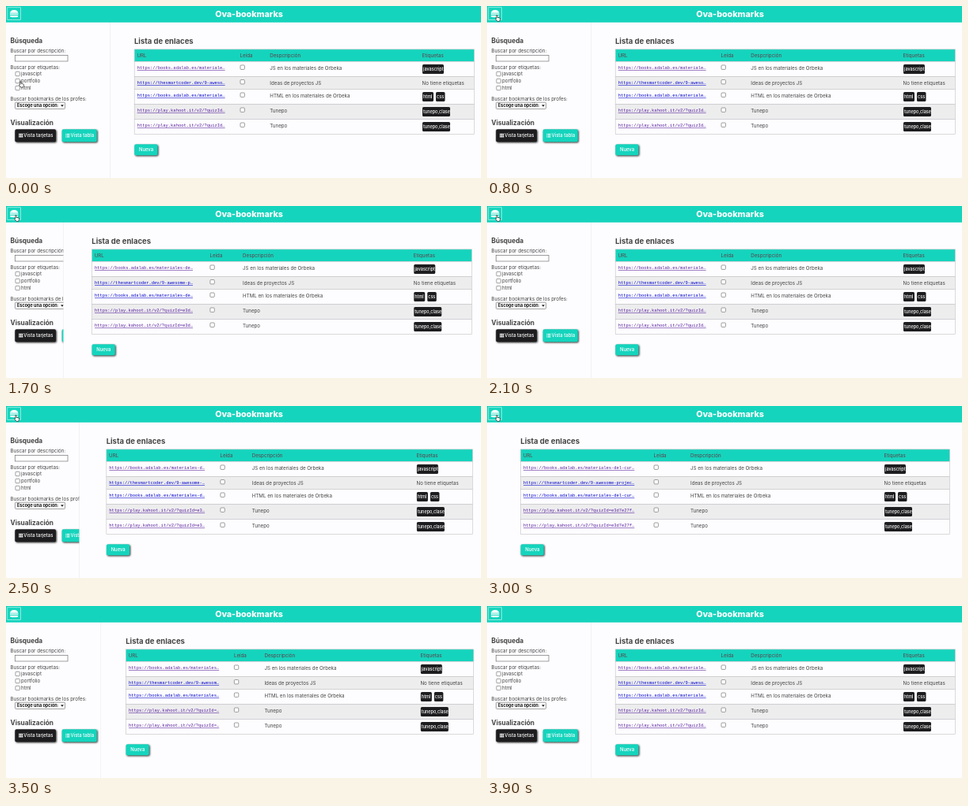
Animation, 600 px wide and 218 px high, one loop 4.6 s. Source, as an HTML page:

```html
<!DOCTYPE html>
<html lang="es">
<head>
<meta charset="utf-8">
<style>
  html, body { margin: 0; width: 100%; height: 100%; overflow: hidden; background: #fdfcfe; }
  svg { display: block; width: 600px; height: 218px; }
  text { font: 6.2px Inter, sans-serif; fill: #444; white-space: pre; }
  .title { font-size: 10.7px; font-weight: 800; fill: #fff; text-anchor: middle; }
  .h1 { font-size: 9.5px; font-weight: 700; }
  .h2 { font-size: 8.3px; font-weight: 700; }
  .th { fill: #5c4148; }
  .btn { font-size: 5.9px; font-weight: 500; fill: #fff; }
  .tag { font-size: 5.5px; font-weight: 500; fill: #fff; }
  .option { font-size: 5.5px; font-weight: 700; fill: #111; }
  .link { font: 5.45px "Liberation Mono", monospace; text-decoration: underline; fill: #00c; }
  .visited { fill: #551a9b; }
  .shadow { filter: drop-shadow(1px 1px 1px #333); }
</style>
</head>
<body>
<svg id="stage" viewBox="0 0 600 218"></svg>
<script>
const LOOP = 4600, STEP = 100, SLIDE = 500;
const CLICKS = [820, 1540, 2400, 3180]; // close, open, close, open
const TEAL = '#15d4bd', BLACK = '#1d1d1f';
const GRID = 'stroke="#c4c4c6" stroke-width=".6"';
const stage = document.getElementById('stage');

const BOOKS = 'https://books.adalab.es/materiales-del-cur';
const QUIZ = 'https://play.kahoot.it/v2/?quizId=e3d7e27f';
// top and bottom edge, text baseline, checkbox top
const ROWS = [
  { top: 70.3, end: 89.5, base: 80.5, box: 75, url: BOOKS, visited: true,
    text: 'JS en los materiales de Orbeka', tags: [['javascript', 27]] },
  { top: 89.5, end: 105.5, base: 99.5, box: 93.5, url: 'https://thesmartcoder.dev/9-awesome-projec',
    text: 'Ideas de proyectos JS', tags: [] },
  { top: 105.5, end: 124.5, base: 115.5, box: 110, url: BOOKS,
    text: 'HTML en los materiales de Orbeka', tags: [['html', 14], ['css', 11.5]] },
  { top: 124.5, end: 143.5, base: 134.5, box: 129, url: QUIZ, visited: true,
    text: 'Tunepo', tags: [['tunepo,clase', 35]] },
  { top: 143.5, end: 162.5, base: 153.5, box: 148, url: QUIZ, visited: true,
    text: 'Tunepo', tags: [['tunepo,clase', 35]] },
];

const mix = (a, b, k) => a + (b - a) * k;
const rect = (x, y, w, h, fill, extra = '') =>
  `<rect x="${x}" y="${y}" width="${w}" height="${h}" fill="${fill}" ${extra}/>`;
const text = (x, y, s, cls = '') => `<text x="${x}" y="${y}" class="${cls}">${s}</text>`;
const field = (x, y, w, h, r = 0) => rect(x, y, w, h, '#fff', `rx="${r}" stroke="#767676" stroke-width=".7"`);
const checkbox = (x, y) => field(x, y, 5.4, 5.4, 1);
const button = (x, y, w, h, fill) => rect(x, y, w, h, fill, 'rx="1.8" class="shadow"');

// CSS "ease" curve: cubic-bezier(.25, .1, .25, 1)
function ease(x) {
  const bezier = (a, b, s) => 3 * a * s * (1 - s) ** 2 + 3 * b * s * s * (1 - s) + s ** 3;
  let lo = 0, hi = 1;
  for (let i = 0; i < 20; i++) {
    const s = (lo + hi) / 2;
    if (bezier(.25, .25, s) < x) lo = s; else hi = s;
  }
  return bezier(.1, 1, lo);
}

function openness(t) {
  const i = CLICKS.findLastIndex(c => t >= c);
  if (i < 0) return 1;
  const k = ease(Math.min(1, (t - CLICKS[i]) / SLIDE));
  return i % 2 ? k : 1 - k;
}

function header() {
  return rect(0, 0, 600, 20.8, TEAL) + text(307, 13.7, 'Ova-bookmarks', 'title') +
    rect(1.8, 1.8, 16.6, 15.8, 'none', 'stroke="#fff" stroke-opacity=".85" stroke-width=".6"') +
    '<path fill="#fff" d="M5 8.8Q5.6 5 10.2 5T15.4 8.8ZM5 9.6h10.4v1.5H5ZM5 11.9h10.4q0 2.3-2 2.3H7q-2 0-2-2.3Z"/>';
}

function sidebar(p) {
  const width = 132 * p;
  let s = text(5.5, 47.2, 'Búsqueda', 'h2') +
    text(5.5, 59.4, 'Buscar por descripción:') + field(11.5, 62.6, 66.5, 7.4) +
    text(5.5, 79.5, 'Buscar por etiquetas:');
  ['javascipt', 'portfolio', 'html'].forEach((name, i) => {
    s += checkbox(12, 83.3 + 9 * i) + text(19, 88.4 + 9 * i, name);
  });
  s += text(5.5, 119.5, 'Buscar bookmarks de los profes:') + field(11.5, 122.2, 63, 8.2, 1) +
    text(14, 128.4, 'Escoge una opción:', 'option') + '<path d="M69 125.3h4l-2 2.4Z" fill="#222"/>' +
    text(5.5, 151, 'Visualización', 'h2') +
    button(11.3, 156.2, 51.7, 16, BLACK) + text(22.3, 166.2, 'Vista tarjetas', 'btn') +
    button(70.6, 156.2, 44.2, 16, TEAL) + text(81.5, 166.2, 'Vista tabla', 'btn');
  for (let i = 0; i < 3; i++) {
    for (let j = 0; j < 3; j++) s += rect(16.2 + 1.8 * j, 161.7 + 1.7 * i, 1.5, 1.4, '#fff');
    s += rect(75.3, 161.9 + 1.8 * i, 1, 1, '#fff') + rect(76.8, 161.9 + 1.8 * i, 3.6, 1, '#fff');
  }
  return `<clipPath id="side">${rect(0, 20, width, 198, '#000')}</clipPath><g clip-path="url(#side)">${s}` +
    rect(width - .6, 20, .6, 198, '#e9e8ea') + '</g>';
}

function table(p) {
  const left = mix(42.5, 162.2, p), right = mix(584.5, 591.3, p), width = right - left;
  const read = mix(211, 296, p), desc = mix(257, 333.3, p), tags = mix(502, 526, p);
  const chars = Math.round(mix(42, 33, p));
  let s = text(left - .2, 47.6, 'Lista de enlaces', 'h1') + rect(left, 54.9, width, 15.4, TEAL, GRID) +
    text(left + 3.2, 64.8, 'URL', 'th') + text(read - .4, 64.8, 'Leída', 'th') +
    text(desc, 64.8, 'Despcripción', 'th') + text(tags - .4, 64.8, 'Etiquetas', 'th');
  ROWS.forEach((row, i) => {
    s += rect(left, row.top, width, row.end - row.top, i % 2 ? '#ededee' : '#fdfcfe', GRID) +
      text(left + 3.5, row.base - .5, row.url.slice(0, chars) + '…', row.visited ? 'link visited' : 'link') +
      checkbox(read, row.box) + text(desc, row.base, row.text);
    if (!row.tags.length) s += text(tags - .4, row.base, 'No tiene etiquetas');
    let x = tags;
    for (const [name, w] of row.tags) {
      s += rect(x, row.base - 6.5, w, 12, BLACK, 'rx="1.6"') + text(x + 1, row.base + 1.3, name, 'tag');
      x += w + 3;
    }
  });
  return s + button(left, 175.2, 29.3, 14, TEAL) + text(left + 5.8, 183.8, 'Nueva', 'btn');
}

function cursor(t) {
  if (t >= 3400) return '';
  const u = Math.min(1, Math.max(0, (t - 50) / 600)), k = u * u * (3 - 2 * u);
  const x = mix(17.3, 11.5, k) - 18 * k * (1 - k), y = mix(94.7, 11, k);
  return `<path transform="translate(${x} ${y})" fill="#fff" stroke="#222" stroke-width=".7" stroke-linejoin="round"
    d="M.4.8Q1 0 1.6.8V3.4L4.6 4.2Q5.3 4.5 5.1 5.5L4.4 8.4H1.6L-.8 5.5Q-.9 4.6.4 5Z"/>`;
}

let shown = -1;
function frame(now) {
  const t = Math.floor(now % LOOP / STEP) * STEP;
  if (t !== shown) {
    const p = openness(t);
    stage.innerHTML = sidebar(p) + table(p) + header() + cursor(t);
    shown = t;
  }
  requestAnimationFrame(frame);
}
frame(performance.now());
</script>
</body>
</html>
```
